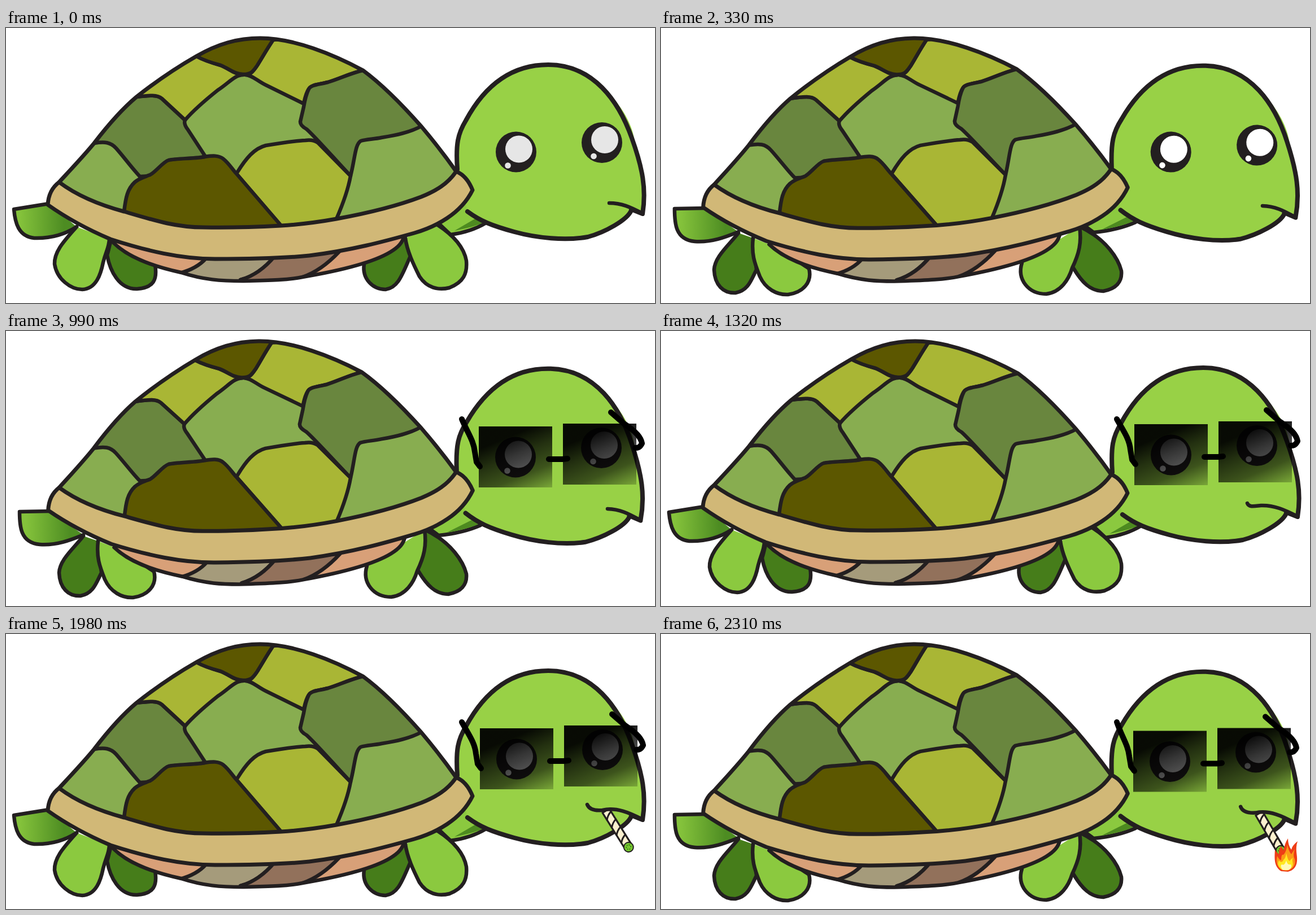
These frames come from a looping animation (1149x487 px, 2.64 s). An HTML page:

```html
<!DOCTYPE html>
<html>
<head>
<meta charset="utf-8">
<title>Turtle</title>
<style>
html, body { margin: 0; height: 100%; overflow: hidden; background: #fff; }
svg { display: block; width: 100vw; height: 100vh; }
</style>
</head>
<body>
<svg viewBox="0 0 1149 487" stroke-linejoin="round" stroke-linecap="round">
  <defs>
    <linearGradient id="tint" x1=".35" y1=".2" x2=".8" y2="1.1">
      <stop offset="0" stop-opacity=".95"/>
      <stop offset=".3" stop-opacity=".77"/>
      <stop offset=".65" stop-opacity=".6"/>
      <stop offset="1" stop-opacity=".2"/>
    </linearGradient>
    <linearGradient id="tailFill">
      <stop offset=".1" stop-color="#84c23b"/>
      <stop offset=".8" stop-color="#4d8c22"/>
    </linearGradient>
    <clipPath id="shellClip"><path id="shellEdge"/></clipPath>
    <clipPath id="bellyClip"><path id="bellyEdge"/></clipPath>
  </defs>
  <g id="stage"></g>
</svg>
<script>
const STEP = 330, STEPS = 8;
const INK = '#231f20', LIME = '#8bc93f', LEAF = '#467d1a', SKIN = '#98d146';
const OLIVE = '#5c5700', GOLD = '#a9b635', MOSS = '#69863e', FERN = '#88ad50', SALMON = '#d8a078';
const $ = id => document.getElementById(id);

const path = (d, fill = 'none', width = 6.5, stroke = INK) =>
  `<path d="${d}" fill="${fill}" stroke="${stroke}" stroke-width="${width}"/>`;
const dot = (x, y, r, fill) => `<circle cx="${x}" cy="${y}" r="${r}" fill="${fill}"/>`;
const group = (attrs, body) => `<g ${attrs}>${body}</g>`;

const dome = 'M94 273C118 247 138 226 156 204C182 170 206 143 231 122C264 96 302 70 337 50' +
  'C375 28 410 18 450 18C510 18 580 47 632 75C670 103 705 140 735 174C757 200 780 230 797 254';
const rimTop = 'C782 276 762 288 735 299C690 316 640 328 585 338Q535 347 487 350' +
  'C450 352 400 354 350 353C300 353 260 340 209 325Q138 306 94 273';
const rim = 'M797 254' + rimTop + 'C82 282 75 295 74 313C105 335 145 357 185 374C250 395 310 409 370 409' +
  'C440 409 490 408 537 403C610 394 670 378 723 363C760 352 805 330 826 287C820 272 812 260 797 254Z';
const belly = 'M190 380C215 405 255 421 310 433C350 446 380 448 420 448C470 447 500 446 525 441' +
  'C590 430 650 415 680 397C695 388 702 380 705 368';
$('shellEdge').setAttribute('d', dome + rimTop + 'Z');
$('bellyEdge').setAttribute('d', belly + 'Z');

const scutes = [
  ['M156 204C175 201 185 202 195 213C210 230 222 247 237 263L300 260L352 226L322 180Q314 170 317 163' +
   'L276 125C268 118 255 119 231 122L120 110Z', MOSS],
  ['M231 122C255 119 268 118 276 125L317 163C330 148 350 130 375 110C395 97 405 83 420 83' +
   'C405 82 395 72 380 66C365 62 350 57 337 50L250 30Z', GOLD],
  ['M473 21C462 37 455 50 445 66C438 76 433 83 424 83C437 84 445 94 460 101L527 134' +
   'C529 125 531 115 536 108C540 100 555 100 570 96C590 90 610 80 632 75L620 10Z', GOLD],
  ['M337 50C350 57 365 62 380 66C395 72 405 82 420 82C435 82 438 76 445 66C455 50 462 37 473 21L450 0L337 0Z', OLIVE],
  ['M632 75C610 80 590 90 570 96C555 100 540 100 536 108C531 118 529 128 527 140L521 166Q521 173 532 179' +
   'C545 190 580 230 610 262C618 230 618 206 628 200C638 197 650 197 665 194C690 190 715 185 735 174L760 100Z', MOSS],
  ['M408 258C425 230 440 213 460 208C490 203 510 200 530 199Q543 197 552 203L610 262C605 290 595 315 585 338' +
   'L560 380H500L487 350Z', GOLD],
  ['M209 325C212 300 215 285 228 273C236 266 245 264 255 260C265 255 278 237 288 234C300 231 340 231 352 228' +
   'C365 226 377 225 385 232C395 240 402 252 408 258L487 350L440 380H220Z', OLIVE]
];
const bands = [
  ['M354 408Q338 426 308 434V470H415V446Q448 437 475 405Z', '#a59b7b'],
  ['M475 405Q448 437 415 446V470H525V441Q558 430 590 396Z', '#92715b']
];

// Far legs come first so that near legs overlap them.
const poses = [{
  tail: 'M76 311L14 321C16 345 22 369 50 372C80 373 105 365 125 352',
  neck: 'M765 345L787 366C810 363 830 357 850 345L870 300H790',
  shade: 'M794 359C815 355 835 350 846 344L830 338Z',
  legs: [
    ['M186 376C183 385 182 393 179 402C184 430 200 463 232 462C262 460 268 445 264 420L220 395', LEAF],
    ['M634 418C630 445 650 463 672 463C695 460 702 435 716 404L708 374', LEAF],
    ['M125 352C105 375 85 395 86 418C90 445 115 463 135 463C160 462 168 435 172 415C177 395 182 390 183 374', LIME],
    ['M707 372C710 395 722 420 732 440C745 460 765 465 785 460C810 450 817 435 815 412C812 395 800 372 763 348', LIME]
  ],
  body: '', head: '', glint: '#e6e6e6'
}, {
  tail: 'M78 319L24 320C24 345 25 375 60 378C90 380 115 370 137 361',
  neck: 'M740 343L766 362C795 359 820 353 840 344L870 300H780',
  shade: 'M780 357C805 353 825 347 836 342L824 335Z',
  legs: [
    ['M137 363C120 385 95 405 94 428C95 455 110 470 132 469C155 465 160 445 169 428L163 372', LEAF],
    ['M730 425C745 450 760 466 783 466C805 462 817 450 815 430C810 410 790 375 742 352', LEAF],
    ['M163 372C160 400 165 415 175 440C185 462 205 473 225 472C252 468 268 450 262 426L205 388', LIME],
    ['M639 416C630 445 650 471 682 471C708 468 722 445 728 425C740 400 745 380 741 352', LIME]
  ],
  body: 'transform="rotate(-.7 450 260)"', head: 'transform="rotate(1.7 900 210)"', glint: '#fff'
}];

const mouths = {
  flat: 'M1068 310C1090 310 1105 317 1126 328',
  smile: 'M1038 305C1041 313 1052 310 1062 309C1085 308 1105 317 1126 328',
  grin: 'M1029 302C1033 312 1045 313 1056 312C1080 306 1105 317 1126 328'
};

// at = offset of the eyes and glasses; no offset means no glasses.
const steps = [
  { mouth: 'flat' },
  { mouth: 'flat' },
  { mouth: 'flat', at: [0, 0], slipped: false },
  { mouth: 'flat', at: [-1, 4], slipped: true },
  { mouth: 'smile', at: [0, 0], slipped: true },
  { mouth: 'grin', at: [-2, 5], slipped: true },
  { mouth: 'grin', at: [1, 2], slipped: true, smoke: true },
  { mouth: 'grin', at: [-2, 6.5], slipped: true, smoke: true, lit: true }
];

function shell() {
  const fill = list => list.map(([d, c]) => path(d, c)).join('');
  return path(belly + 'Z', SALMON, 0) +
    group('clip-path="url(#bellyClip)"', fill(bands)) + path(belly) +
    path(dome + rimTop + 'Z', FERN, 0) +
    group('clip-path="url(#shellClip)"', fill(scutes)) +
    path(dome, 'none', 7) + path(rim, '#d1b877', 7);
}

function headShape() {
  const skull = 'M799 250C796 205 800 187 814 164C850 97 900 65 960 65' +
    'C1040 65 1085 130 1108 195C1127 248 1134 285 1127 329';
  const jaw = '1107 323C1100 340 1060 362 1030 370C990 377 940 372 900 361C860 350 840 342 817 325';
  return path(skull + 'L' + jaw + 'Z', SKIN, 0) +
    path('M1070 118C1095 146 1110 175 1113 202L1095 170Z', SKIN, 0) +
    path(skull + 'L1107 321', 'none', 8) + path('M' + jaw, 'none', 8);
}

const eye = (x, y, glint) => dot(x, y, 36, INK) + dot(x + 5, y - 5, 24, glint) + dot(x - 14.5, y + 24, 5.3, glint);
const eyes = glint => eye(903, 219.5, glint) + eye(1055, 203, glint);

function glasses(slipped, [dx, dy]) {
  const lens = (x, y) => `<rect x="${x}" y="${y}" width="130" height="108" fill="url(#tint)"/>`;
  const wire = d => path(d, 'none', 10, '#000');
  const arms = slipped
    ? wire(`M${807 - dx} ${156 - dy}C818 176 829 190 831 210L834 228L840 236`) +
      wire('M1072 140L1095 160C1118 175 1125 185 1127 195C1123 203 1119 203 1115 203')
    : wire('M801 153L814 174L830 220L833 229L840 234') +
      wire('M1080 142L1090 160L1115 178L1130 198Q1124 203 1113 203');
  return lens(838, 165) + lens(987, 160) + wire('M962 223H986L995 222') + arms;
}

// A striped paper roll along its own x axis.
function roll() {
  let s = path('M0 -7H72Q78 0 72 7H0Z', '#fbf0cf', 3.2);
  for (let x = 6; x < 66; x += 16) s += path(`M${x} -7Q${x + 2} 1 ${x + 9} 7`, 'none', 3);
  s += dot(76, 0, 9.5, INK) + dot(76, 0, 7.5, '#76c72f');
  for (let a = 0; a < 6; a++) s += dot(76 + 4 * Math.cos(a), 4 * Math.sin(a), 1, '#2f6b14');
  return group('transform="translate(1062 313) rotate(58)"', s);
}

const flame = () =>
  path('M1098 420C1085 412 1086 397 1087 382Q1091 388 1094 390Q1093 381 1098 376Q1101 380 1102 384' +
    'Q1104 371 1110 362Q1110 374 1116 382Q1117 375 1127 367C1122 382 1127 391 1126 402C1125 414 1118 419 1110 421Z', '#ee3d16', 0) +
  path('M1098 417Q1087 409 1091 393Q1095 401 1098 400Q1098 389 1102 391Q1107 386 1109 373Q1111 385 1116 390' +
    'Q1119 385 1122 381Q1118 392 1122 399C1125 411 1115 419 1106 419Z', '#fb9a16', 0) +
  path('M1100 418C1089 409 1093 404 1094 401Q1099 407 1102 400Q1106 397 1107 388Q1110 402 1113 402' +
    'Q1116 398 1119 396C1115 404 1124 408 1113 417Z', '#ffe81f', 0) +
  path('M1101 418Q1095 411 1099 408Q1104 411 1107 401Q1109 410 1115 408Q1118 414 1111 418Z', '#fff9b8', 0);

function scene(i) {
  const pose = poses[i % 2], { mouth, at, slipped, smoke, lit } = steps[i];
  const face = at
    ? group(`transform="translate(${at})"`, eyes('#e6e6e6') + glasses(slipped, at))
    : group(pose.head, eyes(pose.glint));
  return path(pose.neck, LIME) + path(pose.shade, '#4d8a20', 0) +
    group(pose.head, headShape() + (smoke ? roll() : '') + path(mouths[mouth])) + face +
    path(pose.tail, 'url(#tailFill)') +
    pose.legs.map(([d, c]) => path(d, c)).join('') +
    group(pose.body, shell()) + (lit ? flame() : '');
}

let shown = -1;
const start = performance.now();
function tick(now) {
  const i = Math.floor(Math.max(0, now - start) / STEP) % STEPS;
  if (i !== shown) $('stage').innerHTML = scene(shown = i);
  requestAnimationFrame(tick);
}
tick(start);
</script>
</body>
</html>
```
